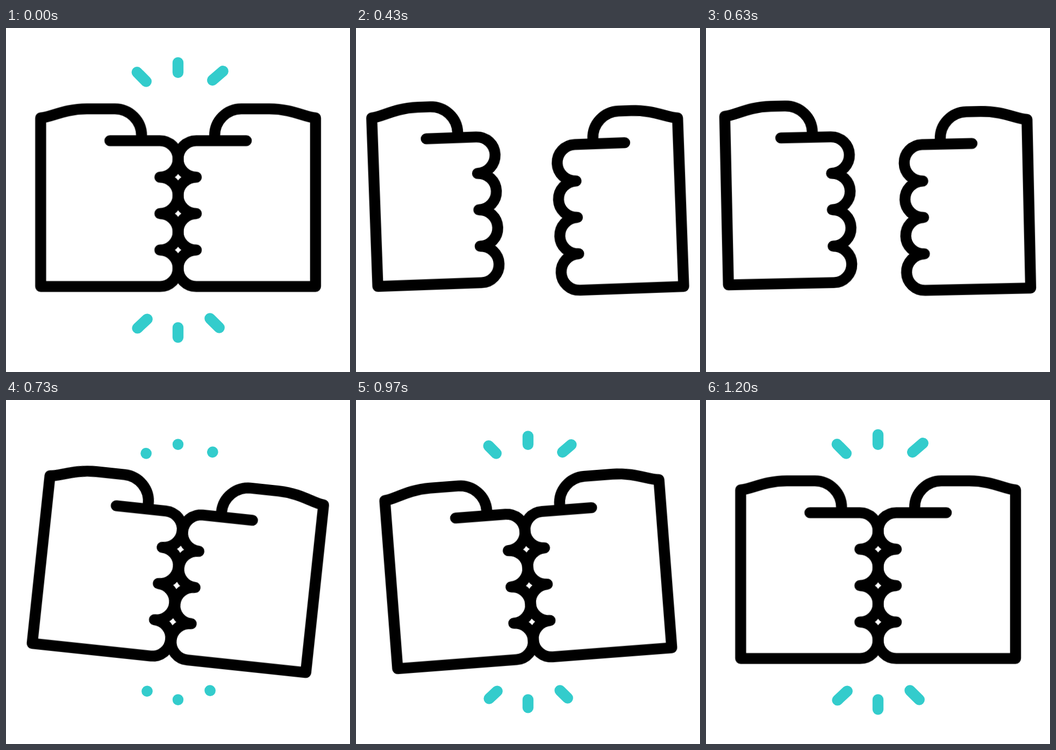
Animation of 640x640 px, one loop 1670 ms. Source, as an HTML page without scripts:

```html
<!DOCTYPE html>
<html lang="en">
<head>
<meta charset="utf-8">
<title>Fist bump</title>
<style>
  html, body { margin: 0; height: 100%; overflow: hidden; background: #fff; }
  svg { display: block; width: 100vw; height: 100vh; fill: none; stroke-width: 20.4; stroke-linecap: round; stroke-linejoin: round; }

  .fists, .fist, .sparks path {
    animation: 1670ms cubic-bezier(.333, 0, .667, 1) infinite;
  }

  /* Both fists wobble together after the impact */
  .fists { stroke: #000; transform-origin: 320.2px 320px; animation-name: wobble; }
  @keyframes wobble {
    0%, 35.7% { transform: rotate(0deg); }
    49.9% { transform: rotate(10.1deg); }
    59.3% { transform: rotate(-5deg); }
    71.9%, 100% { transform: rotate(0deg); }
  }

  /* Each fist pulls back, tilting and shortening; its origin lies on the wrist */
  .fist { --tilt: -3deg; animation-name: pull; }
  .right { --tilt: 3deg; }
  @keyframes pull {
    0%, 16%, 44.3%, 100% {
      transform: translateX(0px) rotate(0deg);
      d: path("M128.8 -135.6 H221.8 a33.9 33.9 0 0 1 0 67.8 a33.9 33.9 0 0 1 0 67.8 a33.9 33.9 0 0 1 0 67.8 a33.9 33.9 0 0 1 0 67.8 H0 V-178 C20 -179.5 44 -194.9 86 -194.9 H138 a49.7 49.7 0 0 1 49.7 49.7 v5");
    }
    31.5%, 33% {
      transform: translateX(-41.5px) rotate(var(--tilt));
      d: path("M87.3 -135.6 H180.3 a33.9 33.9 0 0 1 0 67.8 a33.9 33.9 0 0 1 0 67.8 a33.9 33.9 0 0 1 0 67.8 a33.9 33.9 0 0 1 0 67.8 H0 V-178 C20 -179.5 44 -194.9 86 -194.9 H96.5 a49.7 49.7 0 0 1 49.7 49.7 v5");
    }
  }

  /* Sparks leave outwards, then grow back from the inner end */
  .sparks { stroke: #3cc; }
  .sparks path { stroke-dasharray: 1 2; animation-name: spark; }
  @keyframes spark {
    0%, 4% { stroke-dashoffset: 0; }
    25.7% { stroke-dashoffset: -1; }
    25.71%, 42.1% { stroke-dashoffset: -1.5; }
    42.11% { stroke-dashoffset: 1; }
    63.9%, 100% { stroke-dashoffset: 0; }
  }
</style>
</head>
<body>
<svg viewBox="0 0 640 640">
  <g class="sparks">
    <path pathLength="1" d="M260.8 99.5L243.8 82.3"/>
    <path pathLength="1" d="M320 82.7V64.4"/>
    <path pathLength="1" d="M384.2 97L403.7 80.3"/>
    <path pathLength="1" d="M262.7 541.6L244.6 558.4"/>
    <path pathLength="1" d="M320 557.4V575.5"/>
    <path pathLength="1" d="M379.5 540.5L396.7 557.5"/>
  </g>
  <g class="fists">
    <g transform="translate(64.5 345.3)"><path class="fist"/></g>
    <g transform="translate(575.9 345.3) scale(-1 1)"><path class="fist right"/></g>
  </g>
</svg>
</body>
</html>
```
